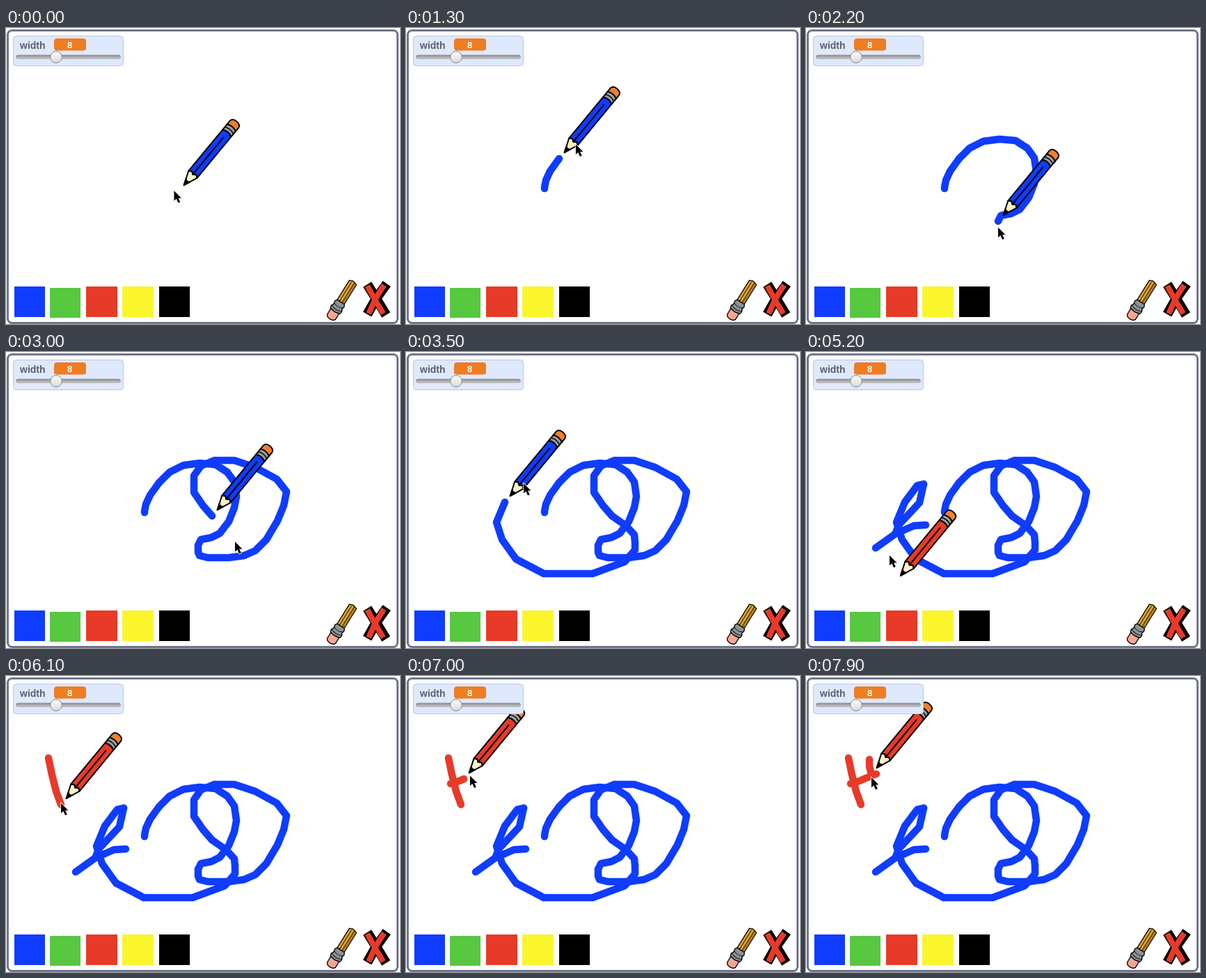
These frames come from a looping animation (566 px wide and 426 px high, 8 s). An HTML page:

```html
<!DOCTYPE html>
<html lang="en">
<head>
<meta charset="utf-8">
<title>Drawing pad</title>
<style>
  html, body { margin: 0; width: 100%; height: 100%; overflow: hidden; background: #fff; }
  svg { display: block; }
  text { font-family: "Liberation Sans", Arial, sans-serif; font-weight: bold; }
  .outlined { stroke: #000; stroke-width: 2; stroke-linejoin: round; stroke-linecap: round; }
  #ink { fill: none; stroke-width: 10.5; stroke-linejoin: round; stroke-linecap: round; }
</style>
</head>
<body>
<svg width="566" height="426" viewBox="0 0 566 426">
  <defs>
    <linearGradient id="knob" x2="0" y2="1">
      <stop stop-color="#fff"/><stop offset="1" stop-color="#d8d8d8"/>
    </linearGradient>
    <linearGradient id="track" x2="0" y2="1">
      <stop stop-color="#858585"/><stop offset="1" stop-color="#cfcfcf"/>
    </linearGradient>
  </defs>
  <rect x="2.5" y="3.5" width="560" height="421" rx="6" fill="#fff" stroke="#70768c" stroke-width="3"/>

  <rect x="12" y="372" width="44" height="44" fill="#0f3cff"/>
  <rect x="63" y="374" width="44" height="43" fill="#57c840"/>
  <rect x="115" y="372" width="45" height="44" fill="#e83a29"/>
  <rect x="167" y="372" width="45" height="44" fill="#fbf52c"/>
  <rect x="220" y="372" width="44" height="44"/>

  <g id="ink"></g>

  <!-- eraser button -->
  <g transform="translate(466 418) rotate(32)" class="outlined" style="stroke-width:1.3">
    <path d="M-6-26V-61L-1-63L6-61V-26Z" fill="#d9a032"/>
    <path d="M2-26V-62L6-61V-26Z" fill="#b07d22" stroke-width=".8"/>
    <path d="M-2-28V-60" fill="none" stroke-width=".8"/>
    <path d="M-7-14V-3Q-6 1 0 1T7-3V-14Z" fill="#f7a48e"/>
    <path d="M-8-13L-9-17L-7-20L-8-25L-6-28H6L8-25L7-20L9-17L8-13Q0-10-8-13Z" fill="#8d9294"/>
    <path d="M-8-17Q0-13 8-17M-7-22Q0-18 7-22" fill="none" stroke-width=".9"/>
  </g>

  <!-- clear button -->
  <g fill="none" stroke-linejoin="round">
    <path d="M519 369L532 390L546 413M547 368L532 389L519 412" stroke="#000" stroke-width="14"/>
    <path d="M519 371L530 391L542 411M543 370L531 389L521 411" stroke="#e83a29" stroke-width="8"/>
  </g>

  <g id="pencil" class="outlined">
    <g transform="rotate(39.5)">
      <path d="M0-1L-8-21L-4-24L0-21L4-24L8-21Z" fill="#fdf0c8"/>
      <path d="M0-1L-3.4-9.5Q0-7 3.4-9.5Z"/>
      <path id="body" d="M-8-21V-98Q0-102 8-98V-21L4-24L0-21L-4-24Z"/>
      <path d="M0-23V-90" fill="none"/>
      <path d="M-8-108V-115Q-7-120 0-120T8-115V-108Z" fill="#f08028"/>
      <path d="M-8-98V-108Q0-112 8-108V-98Q0-102-8-98Z" fill="#999da0"/>
      <path d="M-8-103Q0-107 8-103" fill="none" stroke-width="1.5"/>
    </g>
  </g>

  <!-- width slider -->
  <rect x="10.5" y="11.5" width="158" height="43" rx="4" fill="#dfe9fd" stroke="#bcc6dc"/>
  <text x="20" y="30" font-size="14" fill="#595f70">width</text>
  <rect x="69" y="15" width="46" height="17.5" rx="4" fill="#ee7d22"/>
  <text x="91.5" y="28.5" font-size="13" fill="#fff" text-anchor="middle">8</text>
  <rect x="14.5" y="39" width="150" height="5" rx="2.5" fill="url(#track)" stroke="#999" stroke-width=".8"/>
  <circle cx="72" cy="42" r="8.3" fill="url(#knob)" stroke="#858585"/>

  <path id="cursor" d="M0 0V14.5L3.3 11.5L6 17.5L8.8 16.3L6.2 10.5H10.5Z"
        stroke="#fff" stroke-width="1.6" paint-order="stroke"/>
</svg>
<script>
const LOOP = 8000, STEP = 100, COLOUR_PICKED = 4700;
const BLUE = '#0f3cff', RED = '#e83a29';

// Each move: end time, ink colour (null = pen lifted), waypoints as x,y pairs.
// It starts where the previous move ended.
const moves = [
  [0, null, '248,235'],
  [700, null, '225,236 199,231'],
  [900, null, '199,231'],
  [1300, BLUE, '199,229 201,219 207,206 220,188'],
  [2200, BLUE, '235,173 255,163 278,160 301,162 318,173 328,187 331,208 328,224 320,244 307,261 295,267 280,270 276,278'],
  [2300, BLUE, '276,288'],
  [3000, BLUE, '278,293 290,296 320,296 342,293 358,286 374,270 390,243 399,221 403,201 389,183 358,166 328,156 299,156 280,164 270,178 270,202 283,221 296,236'],
  [3100, BLUE, '316,250 328,263 329,274'],
  [3600, BLUE, '329,285 314,302 268,319 198,319 158,298 138,270 130,245 142,216 160,192 169,190'],
  [3900, BLUE, '163,217 134,248 128,262 100,282 128,262 155,250 172,249'],
  [4100, null, '158,300 142,350'],
  [4200, null, '142,353'],
  [4400, null, '139,388'],
  [4900, null, '138,393'],
  [5000, null, '138,393'],
  [5800, null, '125,310 85,180 61,118'],
  [6100, RED, '66,142 72,166 79,185'],
  [6200, null, '79,184'],
  [6700, null, '70,170 64,155'],
  [7200, RED, '72,153 86,147 101,141'],
  [7500, null, '96,128 91,120'],
  [7700, null, '91,120'],
  [7900, RED, '91,130 94,141'],
  [8000, null, '94,147']
];

const NS = 'http://www.w3.org/2000/svg';
const byId = id => document.getElementById(id);
const [ink, pencil, body, cursor] = ['ink', 'pencil', 'body', 'cursor'].map(byId);

let start = 0, last = [];
const legs = moves.map(([end, colour, text]) => {
  const points = text.split(' ').map(pair => pair.split(',').map(Number));
  const leg = { start, end, points: start || last.length ? [last, ...points] : points };
  if (colour) {
    leg.line = ink.appendChild(document.createElementNS(NS, 'polyline'));
    leg.line.setAttribute('stroke', colour);
  }
  start = end;
  last = points.at(-1);
  return leg;
});

// Waypoints passed at time t, ending with the interpolated position.
function trace({ start, end, points }, t) {
  if (t >= end) return points;
  const at = (t - start) / (end - start) * (points.length - 1);
  const i = Math.floor(at), f = at - i;
  const tip = points[i].map((v, axis) => v + (points[i + 1][axis] - v) * f);
  return [...points.slice(0, i + 1), tip];
}

const position = t => trace(legs.find(leg => t <= leg.end), t).at(-1);
const place = (node, [x, y], dx, dy) =>
  node.setAttribute('transform', `translate(${x + dx} ${y + dy})`);

function draw(now) {
  const t = Math.floor(now % LOOP / STEP) * STEP;
  for (const leg of legs) {
    if (leg.line) leg.line.setAttribute('points', t > leg.start ? trace(leg, t).join(' ') : '');
  }
  place(pencil, position(t), 7, -8);
  place(cursor, position(t + STEP), 0, -1);  // the pencil trails the pointer by one step
  body.setAttribute('fill', t < COLOUR_PICKED ? BLUE : RED);
  requestAnimationFrame(() => draw(performance.now()));
}
draw(performance.now());
</script>
</body>
</html>
```
